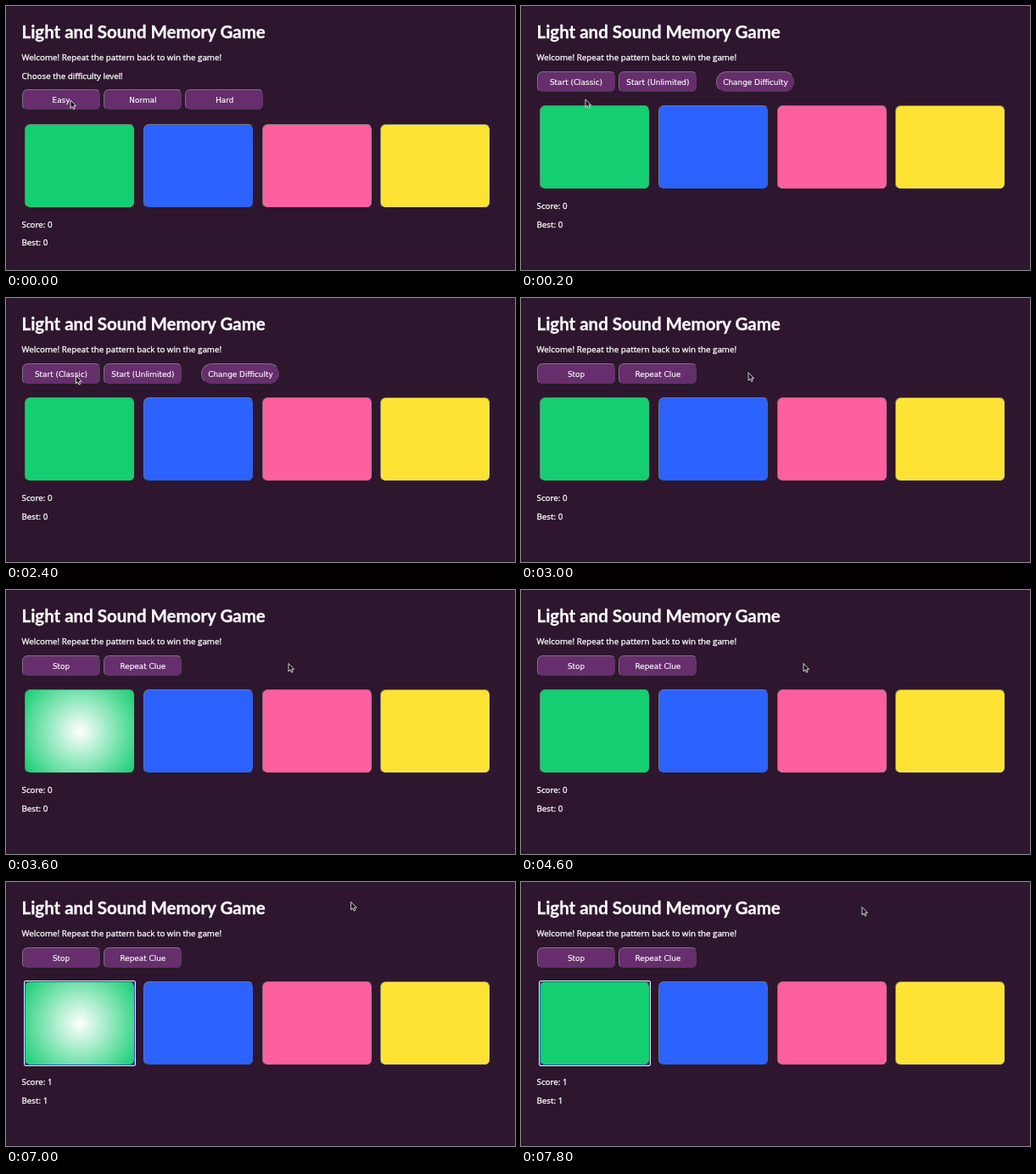
An HTML page for the animation above (8 s loop, 600 by 311 pixels).

```html
<!DOCTYPE html>
<html lang="en">
<head>
<meta charset="utf-8">
<title>Memory Game</title>
<style>
  html, body { margin: 0; width: 100%; height: 100%; overflow: hidden; background: #2d162e; }
  body { position: relative; color: #fff; font: 9.8px/20px "Open Sans", sans-serif; -webkit-text-stroke: .3px #fff; }
  body * { position: absolute; box-sizing: border-box; white-space: nowrap; }
  h1 { margin: 0; left: 18.5px; top: 15px; font: bold 20.5px/30px Lato, sans-serif; }
  p { margin: 0; left: 18.5px; }
  .set, #board { left: 0; top: 0; }
  .key {
    top: 76.6px; width: 93px; height: 25px; border: 1px outset #767676; border-radius: 6.5px;
    background: #662e6d; font: 8.9px/24px "DejaVu Sans", sans-serif; text-align: center;
    -webkit-text-stroke-width: .15px;
  }
  .round { border-radius: 12.5px; }
  .pad { top: 117px; width: 130px; height: 99px; border: 1px outset #767676; border-radius: 6.5px; background: var(--c); }
  .pad.lit { background: radial-gradient(circle, #fff, var(--c)); }
  .pad.focus::after {
    content: ""; position: absolute; inset: -2px; border: 1px solid #dceaff; border-radius: 2px;
    box-shadow: inset 0 0 0 1px #2458b8;
  }
  #cursor { left: 0; top: 0; width: 14px; height: 18px; overflow: visible; }
</style>
</head>
<body>
<h1>Light and Sound Memory Game</h1>
<p style="top:51px">Welcome! Repeat the pattern back to win the game!</p>
<p id="choose" style="top:72.6px">Choose the difficulty level!</p>
<div id="board">
  <p style="top:226px">Score: <span id="score"></span></p>
  <p style="top:247.6px">Best: <span id="best"></span></p>
</div>
<svg id="cursor"><path d="M0 0V9.4L2.1 7.4 3.5 10.6 5.1 9.9 3.7 6.8H6.6Z" fill="#111" stroke="#fff" stroke-width=".8"/></svg>
<script>
  const $ = id => document.getElementById(id);
  const board = $('board'), cursor = $('cursor');
  for (const s of document.querySelectorAll('span')) s.style.position = 'static';

  function add(parent, cls, left, text = '') {
    const el = document.createElement('div');
    el.className = cls;
    el.style.left = left + 'px';
    el.textContent = text;
    parent.append(el);
    return el;
  }

  // Button rows for the three phases: difficulty, mode, playing
  const sets = [
    ['Easy', 'Normal', 'Hard'],
    ['Start (Classic)', 'Start (Unlimited)', 'Change Difficulty'],
    ['Stop', 'Repeat Clue']
  ].map((labels, phase) => {
    const set = add(board, 'set', 0);
    labels.forEach((label, i) => {
      const round = phase === 1 && i === 2;
      add(set, round ? 'key round' : 'key', round ? 230 : 18.5 + 96.4 * i, label);
    });
    return set;
  });

  const pads = ['#14ce72', '#2c62fe', '#fe5f9f', '#fee335'].map((color, i) => {
    const pad = add(board, 'pad', 22 + 139.8 * i);
    pad.style.setProperty('--c', color);
    return pad;
  });

  // Pointer waypoints: time, x, y
  const path = [
    [0, 76, 111], [200, 76, 110], [1400, 76, 110], [2400, 82.5, 91.5], [2600, 82.5, 91.5],
    [3200, 333, 86.5], [4800, 333, 86.5], [5400, 98, 164], [6400, 98, 164],
    [6600, 420, 6], [7200, 402, 29.5], [8000, 402, 29.5]
  ];

  function pointer(t) {
    const i = path.findIndex(p => p[0] > t);
    const [t0, x0, y0] = path[i - 1], [t1, x1, y1] = path[i];
    const u = (t - t0) / (t1 - t0), e = u * u * (3 - 2 * u);
    return [x0 + (x1 - x0) * e, y0 + (y1 - y0) * e];
  }

  const within = (t, a, b) => t >= a && t < b;

  function draw(t) {
    const phase = t < 200 ? 0 : t < 2600 ? 1 : 2;
    sets.forEach((set, i) => set.hidden = i !== phase);
    $('choose').hidden = phase > 0;
    board.style.top = phase ? 0 : '21.6px';

    const lit = within(t, 3600, 4600) || within(t, 5400, 5800) || within(t, 6800, 7600);
    pads[0].classList.toggle('lit', lit);
    pads[0].classList.toggle('focus', t >= 5400);
    $('score').textContent = $('best').textContent = t < 5800 ? 0 : 1;

    const [x, y] = pointer(t);
    cursor.style.transform = `translate(${x}px, ${y}px)`;
    cursor.style.visibility = within(t, 6200, 6600) ? 'hidden' : 'visible';
  }

  // The picture advances five times a second
  const start = performance.now();
  function tick() {
    const t = (performance.now() - start) % 8000;
    draw(Math.floor(t / 200) * 200);
    requestAnimationFrame(tick);
  }
  tick();
</script>
</body>
</html>
```
